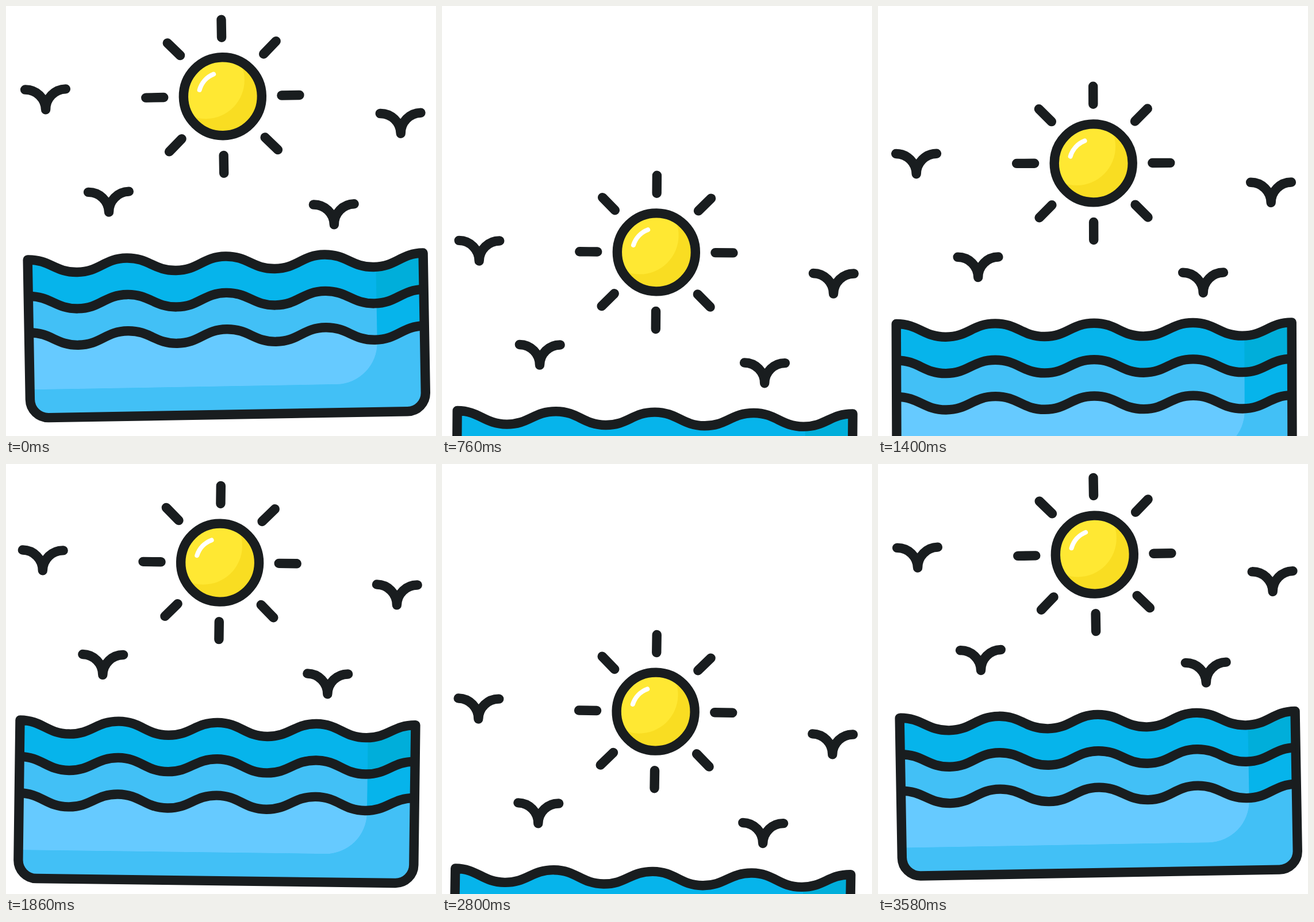
Recreate the animation shown at these times as an HTML page. Size 748x748 px, loop 3.6 s.

```html
<!DOCTYPE html>
<html lang="en">
<head>
<meta charset="utf-8">
<title>Sun over the sea</title>
<style>
  html, body { margin: 0; width: 100%; height: 100%; overflow: hidden; background: #fff; }
  svg { display: block; width: 100vw; height: 100vh; }
  .line { fill: none; stroke: #191d1f; stroke-width: 16.4; stroke-linecap: round; stroke-linejoin: round; }
</style>
</head>
<body>
<svg viewBox="0 0 748 748">
  <defs>
    <clipPath id="basin"><path id="basinShape"/></clipPath>
    <clipPath id="lit"><path d="M0 400H635.5V589.5a72 72 0 0 1-72 72H0Z"/></clipPath>
    <clipPath id="disc"><circle r="64"/></clipPath>
  </defs>
  <g id="scene">
    <g transform="translate(374.1 157.3)">
      <g clip-path="url(#disc)">
        <circle r="64" fill="#f9dd22"/>
        <circle cx="-29" cy="-29" r="67.5" fill="#ffe833"/>
      </g>
      <path d="M-40-12A41.8 41.8 0 0 1-15-39" fill="none" stroke="#fff" stroke-width="8" stroke-linecap="round"/>
      <circle r="68" class="line"/>
      <g id="rays" class="line"></g>
    </g>
    <g id="birds" class="line"></g>
    <g clip-path="url(#basin)">
      <g id="shade"></g>
      <g id="light" clip-path="url(#lit)"></g>
    </g>
    <g id="outline" class="line"></g>
  </g>
</svg>
<script>
const $ = id => document.getElementById(id);
const LOOP = 3600;

// Four wavelengths of 172, starting and ending on a crest
const wave = y => `M30 ${y}` + 'c39 0 47 23 86 23s47-23 86-23'.repeat(4);
const crests = [435.6, 499, 562.4];
const basin = wave(crests[0]) + 'V678.8a32 32 0 0 1-32 32H62a32 32 0 0 1-32-32Z';
const layers = colors => crests.map((y, i) =>
  `<path d="${wave(y)}V720H30Z" fill="${colors[i]}"/>`).join('');

$('basinShape').setAttribute('d', basin);
$('shade').innerHTML = layers(['#00aeda', '#06b4eb', '#42c0f6']);
$('light').innerHTML = layers(['#06b4eb', '#42c0f6', '#66caff']);
$('outline').innerHTML = `<path d="${basin}"/>` +
  crests.slice(1).map(y => `<path stroke-linecap="butt" d="${wave(y)}"/>`).join('');

$('rays').innerHTML = [...Array(8).keys()].map(i =>
  `<path d="M0-133.6V-102.6" transform="rotate(${i * 45})"/>`).join('');

$('birds').innerHTML = [[66, 175], [172.8, 355.2], [564.2, 383.7], [682.8, 227.2]].map(([x, y]) =>
  `<path d="M${x - 35.4} ${y - 35.4}a35.4 35.4 0 0 1 35.4 35.4a35.4 35.4 0 0 1 35.4-35.4"/>`).join('');

// Keys are [time, value]; every span eases in and out along a half cosine
const bob = [[0, 0], [850, 278.5], [1815, 12.5], [2700, 282], [LOOP, 0]];
const tilt = [[0, -1], [540, 1], [1170, -1], [1710, 1], [2340, -1], [2880, 1], [LOOP, -1]];

function valueAt(keys, t) {
  const i = keys.findIndex(key => key[0] > t);
  const [t0, v0] = keys[i - 1], [t1, v1] = keys[i];
  return v0 + (v1 - v0) * (1 - Math.cos(Math.PI * (t - t0) / (t1 - t0))) / 2;
}

function draw() {
  const t = performance.now() % LOOP;
  $('scene').setAttribute('transform',
    `translate(0 ${valueAt(bob, t)}) rotate(${valueAt(tilt, t)} 374 0)`);
  requestAnimationFrame(draw);
}
draw();
</script>
</body>
</html>
```
